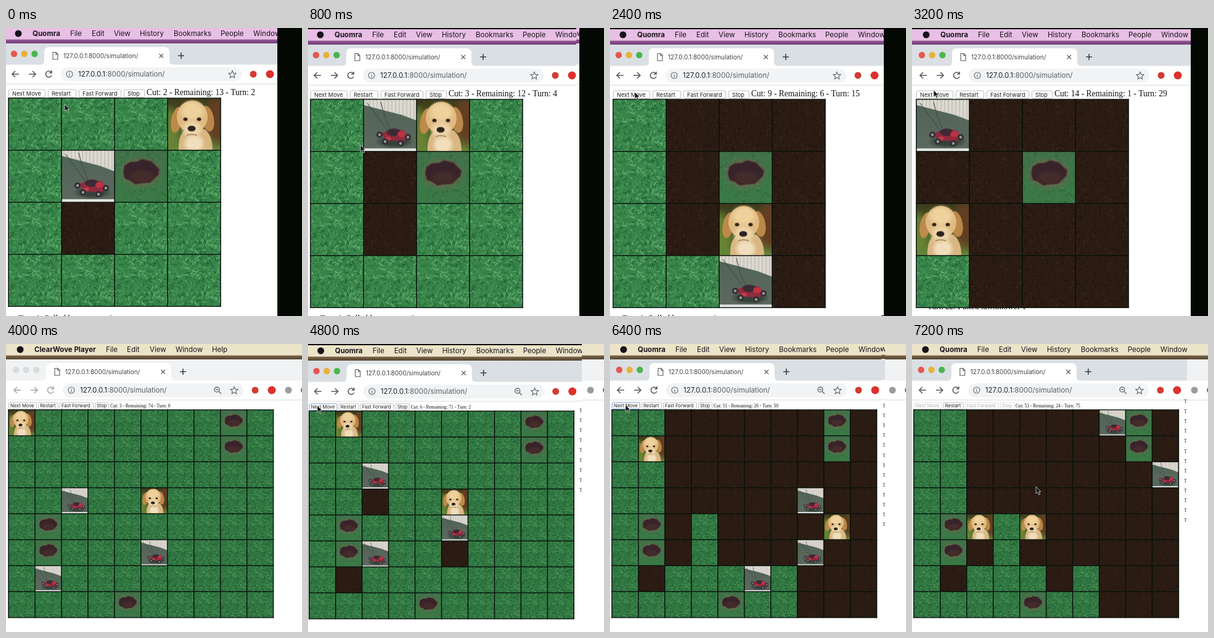
These frames come from a looping animation (480 px wide and 468 px high, 8000 ms). An HTML page with a canvas:

```html
<!DOCTYPE html>
<html lang="en">
<head>
<meta charset="utf-8">
<title>Lawn simulation</title>
<style>
html, body { margin: 0; width: 100%; height: 100%; overflow: hidden; background: #fff; }
canvas { display: block; }
</style>
</head>
<body>
<canvas id="stage" width="480" height="468"></canvas>
<script>
const STEP = 800;
const SANS = 'Inter, sans-serif';
const SERIF = '"Liberation Serif", serif';
const BLACK = '#030803';
const TILE_W = 86, TILE_H = 84;
const stage = document.getElementById('stage').getContext('2d');
let c = stage;

// Tiles: g grass, x dirt, h hole, d dog, m mower, b dog behind mower.
// Each view repaints only its own w by h area, so older edges stay visible.
const views = [
  { w: 480, h: 468, dx: 0, dy: 0, score: [2, 13, 2], cursor: [95, 124],
    rows: 'gggd gmhg gxgg gggg' },
  { w: 435, h: 467, dx: 0, dy: 2, score: [3, 12, 4], cursor: [85, 190],
    rows: 'gmdg gxhg gxgg gggg' },
  { w: 429, h: 466, dx: -2, dy: 4, score: [4, 11, 7], cursor: [78, 274],
    rows: 'gxbg gxhg gxgg gggg' },
  { w: 444, h: 467, dx: 1, dy: 2, score: [9, 6, 15], cursor: [40, 104],
    rows: 'gxxx gxhx gxdx ggmx' },
  { w: 452, h: 468, dx: 3, dy: 2, score: [14, 1, 29], cursor: [35, 101], note: ['Turn 22: Pulled lawnmower 1', 25, 457],
    rows: 'mxxx xxhx dxxx gxxx' },
  { w: 480, h: 468, dx: 3, dy: 0, large: true, inactive: true, score: [3, 74, 0],
    rows: 'dggggggghg gggggggghg gggggggggg ggmggdgggg ghgggggggg ghgggmgggg gmgggggggg gggghggggg' },
  { w: 444, h: 448, dx: 0.7, dy: 2, large: true, focus: true, score: [6, 71, 2], cursor: [15, 100], log: [111, 9],
    rows: 'gdgggggghg gggggggghg ggmggggggg ggxggdgggg ghgggmgggg ghmggxgggg gxgggggggg gggghggggg' },
  { w: 446, h: 448, dx: 3, dy: -1, large: true, focus: true, score: [41, 36, 26], cursor: [18, 97], log: [103, 13],
    rows: 'dgxxxxxxhx ggxxxxxxhx ggxxxxxgxx ggxxxxxgdx ghxgxxggxx ghxgmxggmx gxgggggggm gggghggggg' },
  { w: 440, h: 446, dx: 2, dy: 0, large: true, focus: true, score: [51, 26, 50], cursor: [25, 99], log: [103, 13],
    rows: 'ggxxxxxxhx gdxxxxxxhx ggxxxxxxxx ggxxxxxmxx ghxgxxxxdx ghxgxxxmxx gxgggmgxxx gggghggxxx' },
  { w: 446, h: 446, dx: 1.8, dy: 0, large: true, disabled: true, score: [53, 24, 75], cursor: [201, 232], log: [96, 13],
    rows: 'ggxxxxxmhx ggxxxxxxhx ggxxxxxxxm ggxxxxxxxx ghdgdxxxxx ghxgxxxxxx gxgggxgxxx gggghggxxx' }
];

function rect(x, y, w, h, fill) {
  c.fillStyle = fill;
  c.fillRect(x, y, w, h);
}
function ellipse(x, y, rx, ry, fill, turn = 0) {
  c.fillStyle = fill;
  c.beginPath();
  c.ellipse(x, y, rx, ry, turn, 0, 7);
  c.fill();
}
const dot = (x, y, r, fill) => ellipse(x, y, r, r, fill);
function rounded(x, y, w, h, r, fill, stroke) {
  c.beginPath();
  c.roundRect(x, y, w, h, r);
  if (fill) { c.fillStyle = fill; c.fill(); }
  if (stroke) { c.strokeStyle = stroke; c.lineWidth = 1; c.stroke(); }
}
function path(d, stroke, width = 1.5, fill) {
  const p = new Path2D(d);
  if (fill) { c.fillStyle = fill; c.fill(p); }
  if (stroke) { c.strokeStyle = stroke; c.lineWidth = width; c.stroke(p); }
}
function text(str, x, y, font, fill) {
  c.font = font;
  c.fillStyle = fill;
  c.fillText(str, x, y);
}
function shade(top, bottom, y0 = 0, y1 = TILE_H) {
  const g = c.createLinearGradient(0, y0, 0, y1);
  g.addColorStop(0, top);
  g.addColorStop(1, bottom);
  return g;
}
// An ellipse that fades out towards its edge.
function glow(x, y, rx, ry, rgb, alpha = 1) {
  c.save();
  c.translate(x, y);
  c.scale(rx, ry);
  const g = c.createRadialGradient(0, 0, 0.55, 0, 0, 1);
  g.addColorStop(0, `rgba(${rgb},${alpha})`);
  g.addColorStop(1, `rgba(${rgb},0)`);
  dot(0, 0, 1, g);
  c.restore();
}
function randomFrom(seed) {
  return () => (seed = (seed * 16807) % 2147483647) / 2147483647;
}

// Scatters short straight strokes over a tile.
function scatter(seed, count, colors, length, width) {
  const rnd = randomFrom(seed);
  for (let i = 0; i < count; i++) {
    const x = rnd() * TILE_W, y = rnd() * TILE_H, a = rnd() * 6.3, l = length * (0.4 + rnd());
    c.strokeStyle = colors[Math.floor(rnd() * colors.length)];
    c.lineWidth = width * (0.6 + rnd() * 0.6);
    c.beginPath();
    c.moveTo(x, y);
    c.lineTo(x + l * Math.cos(a), y + l * Math.sin(a));
    c.stroke();
  }
}

const painters = {
  g() {
    rect(0, 0, TILE_W, TILE_H, '#37834a');
    scatter(71, 650, ['#1f5c30', '#2b713d', '#37834a', '#429450', '#4f9f5b', '#70b777'], 7, 1.3);
  },
  x() {
    rect(0, 0, TILE_W, TILE_H, '#2b1c13');
    scatter(29, 450, ['#1d120c', '#25180f', '#33231a', '#3c2a1f'], 2.5, 1.4);
  },
  h() {
    rect(0, 0, TILE_W, TILE_H, shade('#42704a', '#397a46'));
    scatter(43, 300, ['#2f663b', '#3c7847', '#4b8251'], 5, 1.2);
    glow(43, 36, 38, 29, '112,100,78', 0.75);
    path('M14 36L16 25L25 19L37 18L45 14L60 18L67 25L73 31L71 40L64 46L58 52L44 53L34 55L25 49L17 46Z', '#59463d', 1.5, '#38232a');
    glow(44, 42, 25, 13, '68,44,42');
  },
  d() {
    rect(0, 0, TILE_W, TILE_H, shade('#3d3a1b', '#66883a'));
    glow(82, 34, 26, 48, '98,62,34');
    glow(3, 48, 17, 40, '106,135,52', 0.8);
    path('M18 84Q17 60 28 52L60 50Q73 60 73 84Z', null, 0, '#d9b782');
    glow(43, 73, 19, 18, '240,222,188');
    ellipse(15, 35, 9, 21, '#bd8a4c', 0.2);
    ellipse(65, 33, 10, 21, '#bb874a', -0.2);
    ellipse(40, 30, 25, 26, '#dfba80');
    glow(40, 20, 23, 19, '238,209,155');
    glow(40, 50, 19, 17, '236,212,168');
    ellipse(29, 34, 3.5, 2.8, '#33231a');
    ellipse(51, 34, 3.5, 2.8, '#33231a');
    ellipse(39, 49, 6.5, 4.5, '#2c2320');
    path('M31 60Q39 57 48 60', '#94714b', 1.5);
  },
  m() {
    rect(0, 0, TILE_W, TILE_H, shade('#506556', '#5d695f'));
    path('M0 0H86V34L62 25L0 9Z', null, 0, '#dcd9d0');
    for (let x = 4; x < 86; x += 6) path(`M${x} 0V${7 + x * 0.3}`, '#b4b0a9', 1);
    path('M6 6Q24 29 40 52M28 4Q34 30 44 51', '#414a49', 1.1);
    glow(50, 68, 32, 11, '54,65,59');
    path('M28 55L47 47L65 50L74 60L65 68L36 66Z', null, 0, '#8f2b3c');
    ellipse(49, 53, 11, 6, '#3c2a35');
    ellipse(62, 56, 7, 5, '#bb3244');
    ellipse(40, 63, 5, 3, '#c43c4b');
    for (const [x, y] of [[26, 57], [35, 68], [60, 71], [72, 61]]) {
      dot(x, y, 5, '#2a2e33');
      dot(x, y, 2.3, '#a29299');
    }
    rect(0, 79, TILE_W, 5, '#e4e6e2');
  },
  b() {
    rect(0, 0, TILE_W, TILE_H, shade('#61765c', '#4c8546'));
    rect(0, 0, TILE_W, 32, '#796f68');
    for (let x = 6; x < 86; x += 10) rect(x, 0, 1.3, 32, '#625a56');
    rect(0, 0, TILE_W, 4, '#4b403c');
    ellipse(51, 42, 8, 15, '#bb9970');
    ellipse(51, 24, 6.5, 7.5, '#cba981');
    glow(51, 40, 5, 12, '227,211,185');
    path('M8 33L25 31L48 63M8 33L30 66', '#b9b8b5', 1.7);
    path('M25 65L37 58L57 59L64 69L30 73Z', null, 0, '#c13431');
    ellipse(45, 59, 8, 4, '#d94c44');
    dot(29, 70, 4.5, '#343230');
    dot(60, 70, 4.5, '#343230');
    path('M55 76L86 64V76Z', null, 0, '#a4aaa0');
    rect(0, 76, TILE_W, 8, '#4a3d39');
  }
};

const tiles = {};
for (const kind in painters) {
  const canvas = document.createElement('canvas');
  canvas.width = TILE_W;
  canvas.height = TILE_H;
  c = canvas.getContext('2d');
  painters[kind]();
  tiles[kind] = canvas;
}
c = stage;

function drawMenu(v) {
  rect(-5, -10, 490, 10, BLACK);
  rect(-5, 0, 490, 18.5, v.large ? '#ebe4c9' : '#e8bfe5');
  rect(-5, 18.5, 490, 6.5, v.large ? shade('#80694a', '#54452e', 18, 25) : shade('#965a98', '#743e78', 18, 25));
  dot(20, 9, 5.5, '#17131a');
  const items = v.inactive
    ? { 'ClearWove Player': 43, File: 159, Edit: 193, View: 230, Window: 272, Help: 331 }
    : { Quomra: 43, File: 104, Edit: 139, View: 175, History: 217, Bookmarks: 272, People: 348, Window: 401 };
  Object.entries(items).forEach(([label, x], i) =>
    text(label, x, 13.2, `${i ? 400 : 700} 11.5px ${SANS}`, '#1b141c'));
}

function drawBrowser(v) {
  const ink = v.inactive ? '#a4a7aa' : '#55595e';
  rect(-5, 25, 490, 35, v.inactive ? '#f1f2f3' : '#dadfe4');
  const lights = v.inactive ? ['#d8dadb', '#d8dadb', '#d8dadb'] : ['#e5574f', '#e9b03a', '#4ab54c'];
  lights.forEach((fill, i) => dot(13 + i * 16.7, 42, 5.2, fill));

  path('M55 60Q62 60 62 52V39Q62 31 70 31H257Q265 31 265 39V52Q265 60 272 60Z', null, 0, '#fff');
  path('M76 39.5H81L84 42.5V51H76ZM81 39.5V43H84', '#55595e', 1.1);
  text('127.0.0.1:8000/simulation/', 93, 48.5, `10px ${SANS}`, '#3f4246');
  path('M248.5 42L255 48.5M255 42L248.5 48.5', '#5d6165', 1.3);
  path('M279 45H289M284 40V50', '#3f4246', 1.6);

  rect(-5, 59.5, 490, 32, '#fff');
  path('M21 75H10M15 70L10 75L15 80', ink, 1.6);
  path('M37 75H48M43 70L48 75L43 80', v.inactive ? ink : '#55595e', 1.6);
  path('M73.5 72A5 5 0 1 0 74 77M74 69V73H70', ink, 1.6);
  rounded(89, 64, 293, 22.5, 11, '#f1f3f4');
  path('M108 75A5 5 0 1 1 98 75A5 5 0 1 1 108 75M103 74V78M103 72V73', '#5f6368', 1.1);
  text('127.0.0.1', 117, 79.2, `11.6px ${SANS}`, '#202326');
  const hostWidth = c.measureText('127.0.0.1').width;
  text(':8000/simulation/', 117 + hostWidth, 79.2, `11.6px ${SANS}`, '#5c6065');
  if (v.large) path('M343 74A4 4 0 1 1 335 74A4 4 0 1 1 343 74M342 77L346 81M337 74H341', '#5f6368', 1.3);
  path('M367 69.5L368.7 73.4L373 73.8L369.8 76.6L370.7 80.8L367 78.6L363.3 80.8L364.2 76.6L361 73.8L365.3 73.4Z', '#5f6368', 1.1);
  dot(401, 75, 5.5, '#d33b32');
  dot(428, 75, 6.5, '#dd302c');
  if (v.large) {
    dot(455, 75, 5.5, '#9a9da0');
    dot(480, 75, 5, '#5368c5');
  }
  rect(-5, 90.5, 490, 1, '#d7d9db');
}

function drawControls(v) {
  const [top, height, size, pad] = v.large ? [95, 10.5, 7.6, 3] : [100, 12.5, 9.2, 6];
  const boxes = v.large
    ? [['Next Move', 1, 45], ['Restart', 49, 32], ['Fast Forward', 84, 54], ['Stop', 141, 22]]
    : [['Next Move', 4, 59], ['Restart', 68, 45], ['Fast Forward', 118, 68], ['Stop', 191, 33]];
  boxes.forEach(([label, x, w], i) => {
    const off = v.disabled && i !== 1;
    rounded(x + 0.5, top, w, height, 2, '#fff', v.focus && !i ? '#7b9fd0' : off ? '#dedede' : '#bdbdbd');
    text(label, x + pad, top + height / 2 + size * 0.36, `${size}px ${SANS}`, off ? '#b5b5b5' : '#222');
  });
  const [cut, left, turn] = v.score;
  text(`Cut: ${cut} - Remaining: ${left} - Turn: ${turn}`, v.large ? 166 : 228, v.large ? 102.7 : 109,
    `${v.large ? 7.5 : 13.55}px ${SERIF}`, '#111');
}

function drawLawn(v) {
  const rows = v.rows.split(' ');
  const [x0, y0, w, h] = v.large ? [1, 107, 42.95, 42.2] : [4, 114, 86, 84.6];
  const cols = rows[0].length;
  rows.forEach((row, r) => [...row].forEach((kind, i) => {
    const x = x0 + i * w, y = y0 + r * h;
    c.drawImage(tiles[kind], x, y, w, h);
    if (v.large && kind === 'g') rect(x, y, w, h, 'rgba(0,40,20,.14)');
  }));
  for (let i = 0; i <= cols; i++) rect(x0 + i * w - 0.7, y0 - 0.7, 1.5, rows.length * h + 1.4, '#07100a');
  for (let r = 0; r <= rows.length; r++) rect(x0 - 0.7, y0 + r * h - 0.7, cols * w + 1.4, 1.4, '#07100a');
}

function drawView(v) {
  c.save();
  c.beginPath();
  c.rect(0, 0, v.w, v.h);
  c.clip();
  rect(0, 0, 480, 468, '#fff');
  if (!v.large) {
    const [note, x, y] = v.note || ['Turn 1: Pulled lawnmower 1', 20, 475];
    text(note, x, y, `13.4px ${SERIF}`, '#111');
  }
  c.save();
  c.translate(v.dx, v.dy);
  drawMenu(v);
  drawBrowser(v);
  drawControls(v);
  drawLawn(v);
  c.restore();
  if (v.log) {
    const [y, count] = v.log;
    for (let i = 0; i < count; i++) text(`Turn ${i + 1}`, 439.3 + v.dx, y + i * 16.1, `7.5px ${SERIF}`, '#222');
  }
  if (v.cursor) {
    c.translate(...v.cursor);
    path('M0 0V11L2.7 8.6L4.8 13L6.6 12L4.7 8H8Z', '#d5dcd6', 0.8, '#15171a');
  }
  c.restore();
}

let shown = -1;
function tick() {
  const index = Math.floor(performance.now() / STEP) % views.length;
  if (index !== shown) {
    shown = index;
    const first = index < 5 ? 0 : 5;
    for (let i = first; i <= index; i++) {
      drawView(views[i]);
      if (i === 0) rect(440, 0, 40, 468, BLACK);
    }
  }
  requestAnimationFrame(tick);
}
tick();
</script>
</body>
</html>
```
